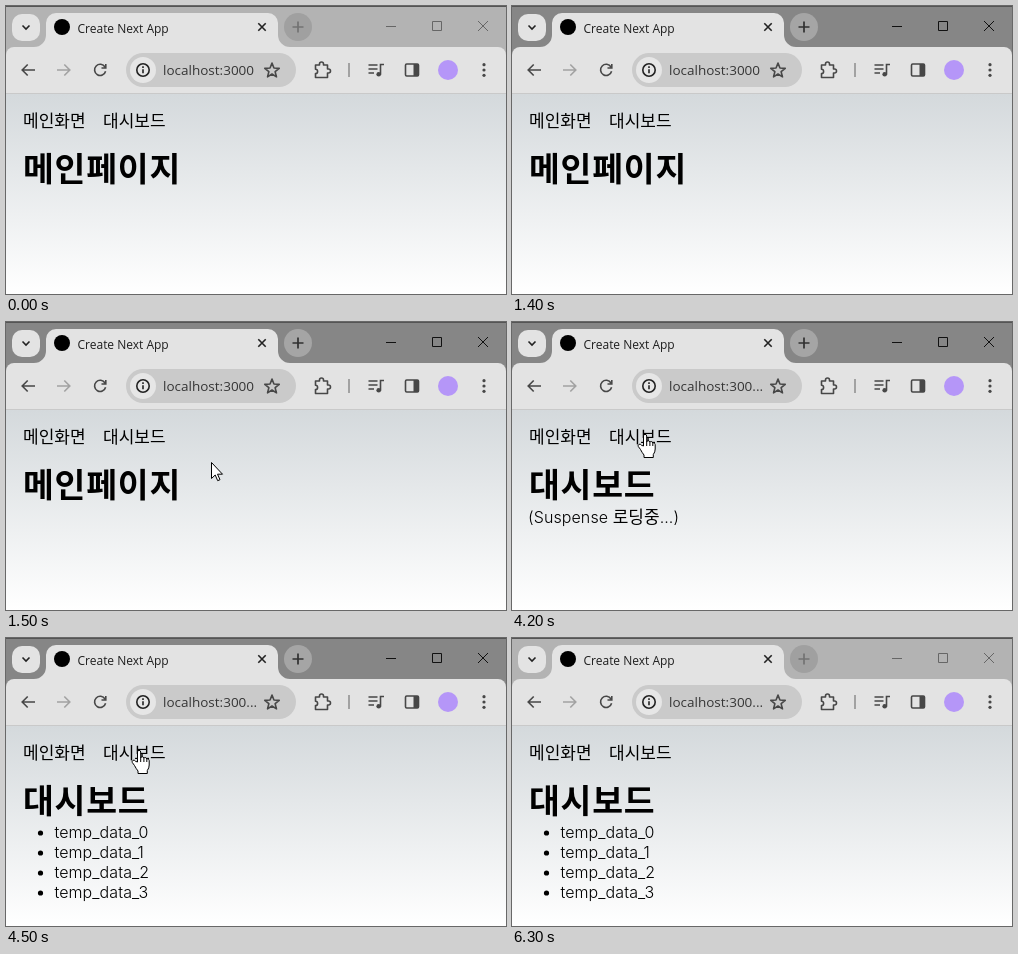
Recreate the animation shown at these times as an HTML page. Size 500 by 288 pixels, loop 6400 ms.

```html
<!DOCTYPE html>
<html lang="ko">
<head>
<meta charset="utf-8">
<title>Create Next App</title>
<style>
html, body { margin: 0; width: 100%; height: 100%; overflow: hidden; background: #fff; }
svg { display: block; width: 500px; height: 288px; }
text { white-space: pre; }
.ui { font-family: "Open Sans", "Noto Sans", sans-serif; }
.ko { font-family: "Noto Sans CJK KR", "Noto Sans CJK", sans-serif; font-size: 17px; font-weight: 300; letter-spacing: 0; }
.en { font-family: Inter, sans-serif; font-size: 16px; font-weight: 350; letter-spacing: .1px; }
.head { font-size: 33.5px; font-weight: 700; letter-spacing: .8px; }
.line { fill: none; stroke: #474747; stroke-width: 1.6; }
.dark { stroke: #222; }
#bar { fill: #868686; }
#plusBg { fill: #a5a5a5; }
#plus { fill: none; stroke: #303030; stroke-width: 1.7; }
#win { fill: none; stroke: #111; stroke-width: 1; }
.idle #bar { fill: #b3b3b3; }
.idle #plusBg { fill: #a0a0a0; }
.idle #plus { stroke: #737373; }
.idle #win { stroke: #666; }
</style>
</head>
<body>
<svg id="stage" class="idle" viewBox="0 0 500 288">
  <defs>
    <linearGradient id="sky" x1="0" y1="0" x2="0" y2="1">
      <stop offset="0" stop-color="#d4d9dc"/>
      <stop offset="1" stop-color="#fff"/>
    </linearGradient>
  </defs>

  <!-- title bar -->
  <rect id="bar" width="500" height="60"/>
  <rect width="500" height="1" fill="#555"/>
  <rect x="6" y="8" width="28" height="27" rx="10" fill="#e3e3e3"/>
  <path d="M16.5 19.5l3.5 3.5 3.5-3.5" class="line dark"/>
  <path d="M28 41a12 12 0 0 0 12-12V17a10 10 0 0 1 10-10H262a10 10 0 0 1 10 10V29a12 12 0 0 0 12 12z" fill="#e3e3e3"/>
  <circle cx="56" cy="21" r="8"/>
  <text class="ui" x="71.5" y="26.5" font-size="12" fill="#1f1f1f">Create Next App</text>
  <path d="M252.3 17.3l7.4 7.4m0-7.4l-7.4 7.4" class="line dark"/>
  <circle id="plusBg" cx="292" cy="21" r="14"/>
  <path id="plus" d="M286.5 21h11M292 15.5v11"/>
  <path id="win" d="M380 20.5h10M426.5 15.5h9v9h-9zM472 15l10 10m0-10l-10 10"/>

  <!-- toolbar -->
  <path d="M0 87V49a8 8 0 0 1 8-8H492a8 8 0 0 1 8 8V87z" fill="#e3e3e3"/>
  <rect y="87" width="500" height="1" fill="#c9c9c9"/>
  <g class="line">
    <path d="M29 64H16.5M21.7 58.5l-5.5 5.500 5.500 5.500"/>
    <path d="M51 64h12.500M58.300 58.500l5.500 5.500-5.500 5.500" stroke="#a2a2a2"/>
    <path d="M99 61a5.600 5.600 0 1 0 .6 4.300M99.800 58v4h-4.300"/>
  </g>
  <rect x="120" y="47" width="170" height="34" rx="17" fill="#cacaca"/>
  <circle cx="137" cy="64" r="13" fill="#e6e6e6"/>
  <circle cx="137" cy="64" r="6.2" class="line dark"/>
  <path d="M137 63.2v4M137 60.3v1.6" class="line dark"/>
  <text id="url" class="ui" x="157" y="69" font-size="13.5" fill="#363636">localhost:3000</text>
  <path id="star" class="line" stroke-linejoin="round"/>
  <g class="line">
    <path d="M309.5 59h4v-1a2 2 0 0 1 4 0v1h4v4h1a2 2 0 0 1 0 4h-1v4.500h-12v-4a2.100 2.100 0 0 0 0-4.200z" stroke-linejoin="round"/>
    <path d="M343 57v14" stroke="#929292"/>
    <path d="M362.500 59h9M362.500 63h9M362.500 67h5.500M374.500 68.500v-10h3.500"/>
    <circle cx="372.700" cy="68.300" r="2.300" fill="#474747" stroke="none"/>
    <rect x="399.500" y="58" width="13" height="12" rx="1.200"/>
    <path d="M407.500 58h5v12h-5z" fill="#474747" stroke="none"/>
  </g>
  <circle cx="442" cy="64" r="10" fill="#b596f8"/>
  <g fill="#474747">
    <circle cx="478" cy="58.700" r="1.600"/><circle cx="478" cy="64" r="1.600"/><circle cx="478" cy="69.300" r="1.600"/>
  </g>

  <!-- page -->
  <rect y="88" width="500" height="200" fill="url(#sky)"/>
  <text class="ko" x="17" y="121">메인화면</text>
  <text class="ko" x="97" y="121">대시보드</text>
  <text id="head" class="ko head" x="17" y="175">메인페이지</text>
  <text id="wait" class="en" x="16" y="200.500">(Suspense <tspan class="ko">로딩중</tspan>...)</text>
  <g id="list" class="en"></g>

  <!-- pointers, hot spot at 0,0 -->
  <g id="hand" fill="#fff" stroke="#000" stroke-linejoin="round">
    <path d="M-1.500 12V2Q-1.500 .3 0 .3T1.700 2V8Q1.900 6.700 3.200 6.700T4.900 8.300Q5.200 7.400 6.300 7.500T7.800 9.200Q8.300 8.600 9.100 8.900T10.200 10.600V15Q10.200 18 8.300 20.500V23.500H-1V21Q-3 18.500-4.500 15.500L-6.700 12.500Q-7.300 11 -6 10.300T-3.500 11.300z"/>
    <path d="M1.700 8v4M4.900 8.300V12M7.800 9.200V12" fill="none"/>
  </g>
  <path id="arrow" d="M.5 .5V16.500l3.700-3.500 2.500 5.700 2.300-1-2.500-5.500h5z" fill="#fff" stroke="#000" stroke-linejoin="round"/>
</svg>
<script>
const $ = id => document.getElementById(id);
const LOOP = 6400;

// start ms, window focused, page, pointer, x, y
const steps = [
  [0,    0, 'main'],
  [1400, 1, 'main'],
  [1500, 1, 'main', 'arrow', 205, 140],
  [1600, 1, 'main', 'hand', 133, 112],
  [1700, 1, 'wait', 'hand', 133, 112],
  [4400, 1, 'list', 'hand', 133, 112],
  [5200, 1, 'list', 'arrow', 178, 117],
  [5300, 1, 'list', 'arrow', 380, 129],
  [5400, 1, 'list'],
  [6300, 0, 'list']
];

$('list').innerHTML = [0, 1, 2, 3].map(i =>
  `<circle cx="34.5" cy="${195 + 20 * i}" r="2.6"/><text x="48.4" y="${200 + 20 * i}">temp_data_${i}</text>`
).join('');

$('star').setAttribute('d', 'M' + Array.from({ length: 10 }, (_, i) => {
  const r = i % 2 ? 3.3 : 7.6, a = i * Math.PI / 5;
  return `${(266 + r * Math.sin(a)).toFixed(2)} ${(64.7 - r * Math.cos(a)).toFixed(2)}`;
}).join('L') + 'z');

const show = (id, on) => { $(id).style.display = on ? '' : 'none'; };

function draw([, focused, page, pointer, x, y]) {
  const main = page === 'main';
  $('stage').classList.toggle('idle', !focused);
  $('url').textContent = main ? 'localhost:3000' : 'localhost:300...';
  $('head').textContent = main ? '메인페이지' : '대시보드';
  show('wait', page === 'wait');
  show('list', page === 'list');
  for (const id of ['hand', 'arrow']) show(id, id === pointer);
  if (pointer) $(pointer).setAttribute('transform', `translate(${x} ${y})`);
}

const start = performance.now();
let last;
function tick() {
  const t = (performance.now() - start) % LOOP;
  const step = steps.findLast(s => s[0] <= t);
  if (step !== last) draw(last = step);
  requestAnimationFrame(tick);
}
tick();
</script>
</body>
</html>
```
